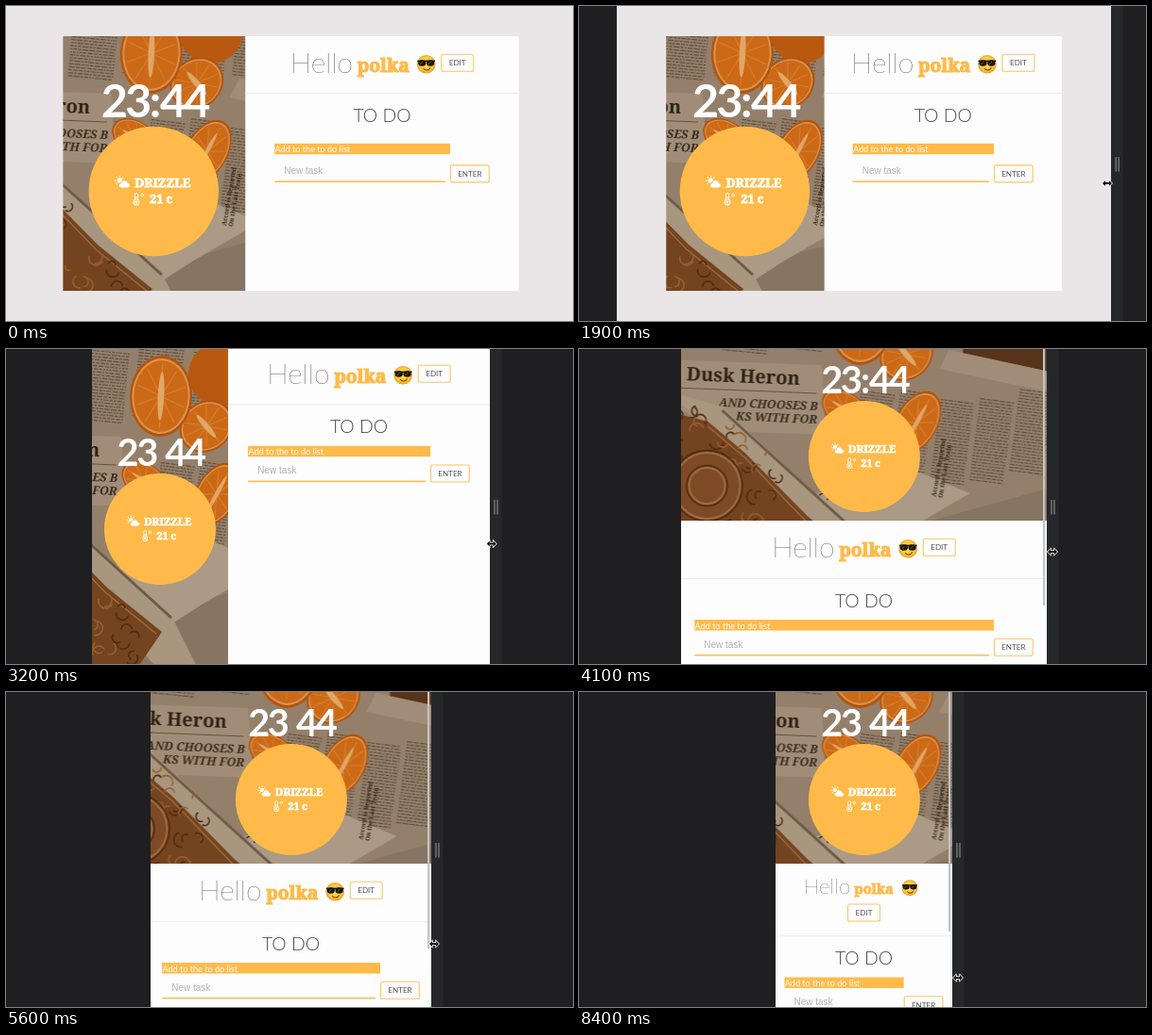
Recreate the animation shown at these times as an HTML page with a canvas. Size 600 by 334 pixels, loop 8500 ms.

```html
<!DOCTYPE html>
<html lang="en">
<head>
<meta charset="utf-8">
<title>Responsive dashboard</title>
<style>
html, body { margin: 0; width: 100%; height: 100%; overflow: hidden; background: #1f1f21; }
canvas { display: block; width: 600px; height: 334px; }
</style>
</head>
<body>
<canvas id="stage"></canvas>
<script>
const W = 600, H = 334, LOOP = 8500, STEP = 100, MID = 301.5, TAU = Math.PI * 2;
const ORANGE = '#ffba49', WHITE = '#fdfdfd', LATO = 'Lato, sans-serif', SLAB = '"Noto Serif", serif';
const canvas = document.getElementById('stage');
const screenCtx = canvas.getContext('2d');
const ratio = Math.max(1, window.devicePixelRatio || 1);
canvas.width = W * ratio;
canvas.height = H * ratio;
let c = screenCtx;

// Drag of the window edge: [time, left edge]; the right edge mirrors it
const DRAG = [[500, 0], [1000, 21], [1800, 35], [2600, 74], [3800, 108], [4500, 108],
  [5600, 153], [7000, 196], [7600, 208]];
// Pointer: [time, offset from the right edge, y]
const POINTER = [[0, 8, 160], [1000, -8, 168], [2400, -2, 199], [4100, 6, 215],
  [5600, 3, 267], [7000, -1, 301], [8400, 6, 303]];

function track(keys, t, field = 1) {
  const i = keys.findIndex(k => k[0] > t);
  if (i < 0) return keys[keys.length - 1][field];
  if (i === 0) return keys[0][field];
  const a = keys[i - 1], b = keys[i];
  return a[field] + (b[field] - a[field]) * (t - a[0]) / (b[0] - a[0]);
}

function rect(x, y, w, h, color) {
  c.fillStyle = color;
  c.fillRect(x, y, w, h);
}

function oval(x, y, rx, ry, color) {
  c.fillStyle = color;
  c.beginPath();
  c.ellipse(x, y, rx, ry, 0, 0, TAU);
  c.fill();
}

const disc = (x, y, r, color) => oval(x, y, r, r, color);

function path(p) {
  c.beginPath();
  for (let i = 0; i < p.length; i += 2) c.lineTo(p[i], p[i + 1]);
}

function poly(color, ...p) {
  path(p);
  c.fillStyle = color;
  c.fill();
}

function line(color, width, ...p) {
  path(p);
  c.strokeStyle = color;
  c.lineWidth = width;
  c.stroke();
}

function arc(color, width, x, y, r, from = 0, to = TAU) {
  c.beginPath();
  c.arc(x, y, r, from, to);
  c.strokeStyle = color;
  c.lineWidth = width;
  c.stroke();
}

function text(str, x, y, font, color, align = 'left') {
  c.font = font;
  c.fillStyle = color;
  c.textAlign = align;
  c.fillText(str, x, y);
}

function slabText(str, x, y, size, color) {
  text(str, x, y, `900 ${size}px ${SLAB}`, color);
  c.strokeStyle = color;
  c.lineWidth = size * 0.06;
  c.strokeText(str, x, y);
}

function at(x, y, angle, scale, draw) {
  c.save();
  c.translate(x, y);
  c.rotate(angle);
  c.scale(scale, scale);
  draw();
  c.restore();
}

function clipped(x, y, w, h, draw) {
  c.save();
  c.beginPath();
  c.rect(x, y, w, h);
  c.clip();
  draw();
  c.restore();
}

function randomFrom(seed) {
  return () => (seed = (seed * 16807) % 2147483647) / 2147483647;
}

// Still life, drawn around its own centre

const rnd = randomFrom(4711);

function column(x, y, w, rows, angle) {
  at(x, y, angle, 1, () => {
    for (let r = 0; r < rows; r++) {
      for (let u = 0; u < w;) {
        const len = 1.5 + rnd() * 5;
        rect(u, r * 3.2, Math.min(len, w - u), 1.2, 'rgba(48,34,22,.5)');
        u += len + 1.2;
      }
    }
  });
}

function orange(x, y, rx, ry, angle) {
  at(x, y, angle, 1, () => {
    oval(0, 0, rx, ry, '#b3530f');
    oval(0, 0, rx * 0.93, ry * 0.93, '#d9944d');
    oval(0, 0, rx * 0.87, ry * 0.88, '#cc6917');
    for (let i = 0; i < 10; i++) {
      const a = (i + 0.5) * TAU / 10;
      line('rgba(235,165,85,.35)', 1.2, 0, 0, rx * 0.8 * Math.cos(a), ry * 0.8 * Math.sin(a));
    }
    oval(0, 0, rx * 0.1, ry * 0.6, '#e0a766');
  });
}

function newspaper() {
  rect(-220, -180, 440, 360, '#94806a');
  for (let i = 0; i < 7; i++) {
    column(-200 + i * 58, -172 + rnd() * 8, 48, 24, 0.1);
    column(-45 + i * 42, -50 + rnd() * 12, 36, 28, 0.13);
  }
  poly('#563319', 100, -180, 220, -180, 220, -60, 105, -84);
  poly('#a18d77', 90, -90, 220, -62, 220, -40, 80, -70);

  poly('#a18d77', -220, -80, -45, -74, -40, 0, -150, -4, -220, -40);
  at(-68, -53, 0.04, 1, () => text('Dusk Heron', 0, 0, `900 20px ${SLAB}`, '#2f2318', 'right'));
  line('#56442f', 0.8, -200, -50, -50, -44);
  at(-49, -26, 0.04, 1, () => {
    ['AND CHOOSES B', 'KS WITH FOR'].forEach((row, i) =>
      text(row, 0, i * 14, `italic 700 12.5px ${SLAB}`, '#3a2c1f', 'right'));
  });
}

function paperAndBook() {
  poly('#877563', 20, 105, 220, 50, 220, 180, -40, 180);
  poly('#aa9a86', -50, 62, 40, 32, 112, 62, 40, 104, 0, 130);
  poly('#a8967f', -220, -50, -150, -30, 10, 120, 40, 180, 0, 180, -170, -16);
  line('#6e5b47', 3, -150, -26, 8, 118);

  poly('#74431f', -220, -28, -165, -14, -125, 20, -60, 86, -2, 133, -34, 180, -220, 180);
  line('#9f6c3c', 1.5, -165, -9, -125, 25, -62, 91, -8, 135);
  for (let i = 0; i < 60; i++) {
    const x = -200 + rnd() * 170, y = x * 0.8 + 100 + rnd() * 110;
    arc(i % 2 ? '#96602f' : '#4f2b12', 1.6, x, y, 3 + rnd() * 5, i, i + 3);
  }
  disc(-166, 54, 35, '#7d4a25');
  for (const r of [19, 35]) {
    arc('#a06d3e', 2, -166, 54, r);
    arc('#4a2912', 1.5, -166, 54, r + 2.5);
  }
}

function paintPhoto() {
  newspaper();
  paperAndBook();
  disc(60, -140, 34, '#b9590f');
  orange(45, -85, 30, 26, -0.7);
  orange(-3, -117, 33, 43, 0.05);
  orange(-20, -27, 18, 27, -1);
  orange(56, -13, 22, 36, 0.5);
  at(76, 66, -1.4, 1, () => {
    ['Accord is Reported', 'On the Last Train'].forEach((row, i) =>
      text(row, 0, i * 7, `600 6.5px ${SLAB}`, '#35281c'));
  });
}

const photo = document.createElement('canvas');
function buildPhoto() {
  photo.width = 440 * ratio;
  photo.height = 360 * ratio;
  c = photo.getContext('2d');
  c.scale(ratio, ratio);
  c.translate(220, 180);
  paintPhoto();
  c = screenCtx;
}

// Interface parts

function clock(cx, base, size, colon) {
  const font = `700 ${size}px ${LATO}`;
  c.letterSpacing = `${-size * 0.06}px`;
  for (const [pair, side] of [['23', -1], ['44', 1]]) {
    text(pair, cx + size * (side * 0.64 - 0.03), base, font, '#fff', 'center');
  }
  c.letterSpacing = '0px';
  if (colon) text(':', cx - 0.5, base, font, '#fff', 'center');
}

function cloud(color, grow) {
  for (const side of [-1, 1]) disc(2 + side * 3.2, 3.2, 2.3 + grow, color);
  disc(2, 1.4, 3.3 + grow, color);
  rect(-1.2, 3, 6.4, 2.5, color);
}

function sunCloud() {
  disc(-3, -2, 2.8, '#fff');
  for (let i = 0; i < 8; i++) {
    at(-3, -2, i * TAU / 8, 1, () => rect(3.8, -0.6, 1.5, 1.2, '#fff'));
  }
  cloud(ORANGE, 1);
  cloud('#fff', 0);
}

function thermometer() {
  c.lineCap = 'round';
  for (const [color, grow] of [['#fff', 1], [ORANGE, 0]]) {
    line(color, 2.2 + grow * 1.8, 0, -4.5, 0, 2);
    disc(0, 3.6, 2.4 + grow, color);
  }
  line('#fff', 1, 0, -2, 0, 3);
  disc(0, 3.6, 1.4, '#fff');
  arc('#fff', 1, 6.2, -4, 1.4);
  c.lineCap = 'butt';
}

function weather(x, y, r) {
  disc(x, y, r, ORANGE);
  at(x, y, 0, r / 69, () => {
    at(-33, -9.5, 0, 1, sunCloud);
    slabText('DRIZZLE', -20, -4.8, 13.1, '#fff');
    at(-18.5, 8, 0, 1, thermometer);
    slabText('21 c', -4, 12.3, 12.6, '#fff');
  });
}

function emoji() {
  const face = c.createRadialGradient(0, -2, 2, 0, 0, 9.8);
  face.addColorStop(0, '#ffdf4d');
  face.addColorStop(0.75, '#fbc234');
  face.addColorStop(1, '#e39a22');
  disc(0, 0, 9.8, face);
  rect(-9.3, -4.2, 18.6, 1.6, '#1b1512');
  for (const x of [-4.4, 4.4]) {
    oval(x, -1.3, 4.1, 3.2, '#1b1512');
    line('#77706a', 0.9, x - 1.8, 0, x + 0.6, -2.6);
  }
  arc('#7a4312', 1.2, 0.5, 2.2, 4, 0.35, 2.6);
}

function button(label, x, y, w) {
  c.beginPath();
  c.roundRect(x + 0.5, y - 9, w - 1, 18, 2);
  c.strokeStyle = '#ffc466';
  c.lineWidth = 1.1;
  c.stroke();
  text(label, x + w / 2, y + 3.1, `400 8.1px ${LATO}`, '#555', 'center');
}

function greeting(cx, y, small) {
  const k = small ? 0.75 : 1;
  const left = cx - (small ? 62 : 95.3);
  const base = y + (small ? 7 : 9.5);
  text('Hello', left - 2, base, `100 ${30 * k}px ${LATO}`, '#000');
  slabText('polka', left + 69 * k, base - 0.3, 19.4 * k, ORANGE);
  at(left + (small ? 110.5 : 142), y + 0.8, 0, small ? 0.86 : 1, emoji);
  if (small) button('EDIT', cx - 17.5, y + 27, 35);
  else button('EDIT', left + 157.5, y - 0.8, 35);
}

function todo(x, w, top, pad, gap) {
  const left = x + pad, right = x + w - pad, split = right - 41.8;
  const bar = top + 50 + gap, row = top + 73 + gap * 1.3;
  rect(x, top - 0.5, w, 1, '#ececec');
  text('TO DO', x + w / 2, top + 30.4, `300 19.4px ${LATO}`, '#4a4a4a', 'center');
  rect(left, bar - 6.2, split - left, 11.4, ORANGE);
  text('Add to the to do list', left + 0.3, bar + 3.4, `400 9.1px ${LATO}`, '#fff');
  text('New task', left + 10, row + 0.3, '10px "Liberation Sans", Arial, sans-serif', '#b0b0b0');
  rect(left, row + 7.6, split - 5 - left, 1.5, ORANGE);
  button('ENTER', split, row, 41.8);
}

function picture(x, y, w, h, cx, cy) {
  clipped(x, y, w, h, () => c.drawImage(photo, cx - 220, cy - 180, 440, 360));
}

// Three layouts, chosen by the viewport width

function wide(left, w, colon) {
  rect(left, 0, w, H, '#eae6e7');
  const x = left + w * 0.1, cw = w * 0.8, pw = cw * 0.4, cx = x + pw / 2;
  const bx = x + pw, bw = cw - pw;
  rect(x, 32, cw, 270, WHITE);
  picture(x, 32, pw, 270, cx, 167);
  weather(cx - 0.5, 196.5, 68.7);
  clock(cx + 1.8, 117.5, 48.6, colon);
  greeting(bx + bw / 2, 61, false);
  todo(bx, bw, 92.5, 24 + 0.024 * bw, 9.5);
}

function medium(left, w, colon) {
  const pw = w * 0.342, cx = left + pw / 2, bx = left + pw, bw = w - pw;
  rect(left, 0, w, H, WHITE);
  picture(left, 0, pw, H, cx + 4, 167);
  weather(cx, 191, 59);
  clock(cx + 1.8, 124, 39.8, colon);
  greeting(bx + bw / 2, 27, false);
  todo(bx, bw, 59, 14.5 + 0.024 * bw, 0);
}

function narrow(left, w, colon) {
  const small = w < 240;
  rect(left, 0, w, H, WHITE);
  picture(left, 0, w, 182, MID, 91);
  weather(MID + 0.4, 114, 59);
  clock(MID + 2, 46.5, 39.8, colon);
  greeting(MID, small ? 207 : 211, small);
  todo(left, w, small ? 258.7 : 243.3, 5 + 0.024 * w, 0);
  rect(left + w - 4, 0, 2.2, small ? 254 : 272, '#c4c4c4');
}

function cursor(x, y) {
  c.beginPath();
  for (const s of [1, -1]) {
    for (const [u, v] of [[-2, 1], [-2, 3], [-5, 0], [-2, -3], [-2, -1]]) c.lineTo(x + s * u, y + s * v);
  }
  c.closePath();
  c.strokeStyle = '#fff';
  c.lineWidth = 1.4;
  c.stroke();
  c.fillStyle = '#111';
  c.fill();
}

function render(t) {
  c.setTransform(ratio, 0, 0, ratio, 0, 0);
  rect(0, 0, W, H, '#1f1f21');
  const left = track(DRAG, t), w = 2 * (MID - left), right = left + w;
  const colon = (t / 2350 + 0.34) % 1 < 0.5;
  const layout = w > 512 ? wide : w > 420 ? medium : narrow;
  rect(right, 0, 12.5, H, '#24282b');
  clipped(left, 0, w, H, () => layout(left, w, colon));
  for (const dx of [4.5, 7.5]) rect(right + dx, 160, 1, 15.5, '#96999b');
  cursor(right + track(POINTER, t), track(POINTER, t, 2));
}

buildPhoto();
const start = performance.now();
function tick() {
  const t = (performance.now() - start) % LOOP;
  render(Math.floor(t / STEP) * STEP);
  requestAnimationFrame(tick);
}
tick();
</script>
</body>
</html>
```
